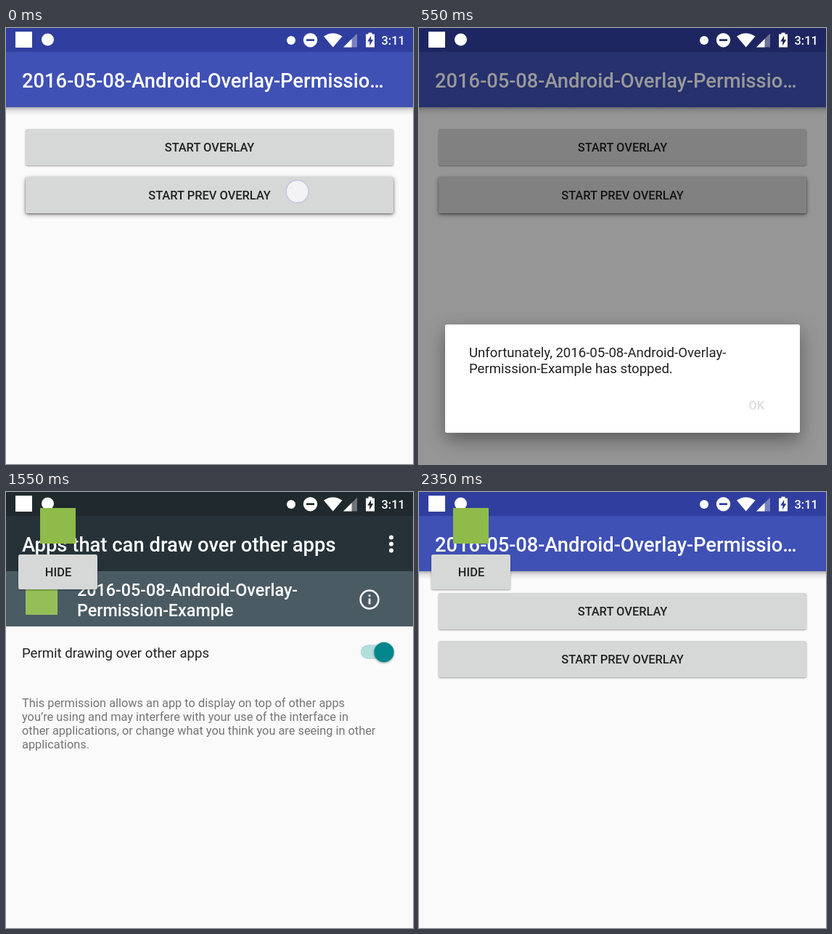
Recreate the animation shown at these times as an HTML page. Size 561x600 px, loop 2.4 s.

```html
<!DOCTYPE html>
<html lang="en">
<head>
<meta charset="utf-8">
<title>Overlay permission</title>
<style>
html, body { margin: 0; width: 100%; height: 100%; overflow: hidden; background: #fafafa; }
svg { display: block; width: 561px; height: 600px; }
text { font: 500 16.45px Roboto, sans-serif; fill: #212121; }
.title { font-size: 27.35px; fill: #fff; }
.name { font-size: 23.35px; fill: #fff; }
.body { font-size: 18.6px; font-weight: 400; }
.note { font-size: 16.35px; font-weight: 400; fill: #757575; }
.mid { text-anchor: middle; }
.btn { fill: #d6d7d7; filter: drop-shadow(0 1px 1.2px rgba(0,0,0,.38)); }
.raised { fill: #d6d7d7; filter: drop-shadow(0 2px 3px rgba(0,0,0,.4)); }
.touch { fill: rgba(248,248,250,.85); stroke: #bfc4e6; stroke-width: 1.5; }
.card { fill: #fff; filter: drop-shadow(0 10px 13px rgba(0,0,0,.38)); }
.thumb { filter: drop-shadow(0 1px 1.5px rgba(0,0,0,.4)); }

/* one loop is 2400 ms, held at 20 poses a second */
.press, .raised, .tap, .dim, .dialog, .settings, .slide, .on, .overlay { animation: 2.4s steps(2) infinite; }
.press { animation-name: press; }
.raised { animation-name: raised; }
.tap { animation-name: tap; }
.dim { animation-name: dim; }
.dialog { animation-name: dialog; }
.settings { animation-name: settings; }
.slide { animation-name: slide; animation-timing-function: steps(3); }
.on { animation-name: on; animation-timing-function: steps(3); }
.overlay { animation-name: overlay; }

@keyframes press {
  0%, 4.1667% { opacity: 1; }
  8.3333%, 100% { opacity: 0; }
}
@keyframes raised {
  0%, 27.0833% { opacity: 1; }
  31.25%, 100% { opacity: 0; }
}
@keyframes dim {
  0%, 12.5% { opacity: 0; }
  16.6667% { opacity: .2; animation-timing-function: steps(3); }
  22.9167%, 27.0833% { opacity: .4; animation-timing-function: steps(3); }
  33.3333%, 100% { opacity: 0; }
}
@keyframes dialog {
  0%, 12.5% { opacity: 0; }
  16.6667% { opacity: .93; }
  18.75%, 27.0833% { opacity: 1; }
  31.25%, 100% { opacity: 0; }
}
@keyframes settings {
  0%, 33.3333% { opacity: 0; transform: translateY(30px); }
  37.5%, 77.0833% { opacity: 1; transform: none; }
  81.25% { opacity: .42; transform: translateY(30px); }
  85.4167%, 100% { opacity: 0; transform: translateY(46px); }
}
@keyframes tap {
  0%, 37.4% { opacity: 0; }
  37.5%, 41.6667% { opacity: 1; }
  45.8333%, 100% { opacity: 0; }
}
@keyframes slide {
  0%, 41.6667% { transform: none; }
  47.9167%, 100% { transform: translateX(28px); }
}
@keyframes on {
  0%, 41.6667% { opacity: 0; }
  47.9167%, 100% { opacity: 1; }
}
@keyframes overlay {
  0%, 52.0833% { opacity: 0; }
  56.25%, 100% { opacity: 1; }
}
</style>
</head>
<body>
<svg viewBox="0 0 561 600">
  <defs>
    <linearGradient id="shade" x2="0" y2="1">
      <stop stop-color="#000" stop-opacity=".3"/>
      <stop offset=".4" stop-color="#000" stop-opacity=".1"/>
      <stop offset="1" stop-color="#000" stop-opacity="0"/>
    </linearGradient>
  </defs>

  <g>
    <rect width="561" height="600" fill="#fafafa"/>
    <rect y="109" width="561" height="11" fill="url(#shade)"/>
    <rect width="561" height="109" fill="#3f51b5"/>
    <rect width="561" height="33" fill="#303f9f"/>
    <text class="title" x="22" y="81.5">2016-05-08-Android-Overlay-Permissio…</text>
    <rect class="btn" x="27" y="139" width="507" height="50" rx="2.5"/>
    <text class="mid" x="280.5" y="170">START OVERLAY</text>
    <rect class="btn" x="27" y="205" width="507" height="50" rx="2.5"/>
    <rect class="raised" x="27" y="205" width="507" height="50" rx="2.5"/>
    <text class="mid" x="280.5" y="235.5">START PREV OVERLAY</text>
  </g>
  <circle class="touch press" cx="401.5" cy="225" r="15.5"/>

  <g class="settings">
    <rect width="561" height="600" fill="#fafafa"/>
    <rect width="561" height="33" fill="#20292d"/>
    <rect y="33" width="561" height="76" fill="#263238"/>
    <rect y="109" width="561" height="76" fill="#4b5b64"/>
    <text class="title" x="22" y="81.5">Apps that can draw over other apps</text>
    <g fill="#fff">
      <circle cx="531" cy="62.5" r="3"/>
      <circle cx="531" cy="71.5" r="3"/>
      <circle cx="531" cy="80.5" r="3"/>
      <circle cx="501" cy="148" r="12.4" fill="none" stroke="#fff" stroke-width="2.5"/>
      <path d="M499.7 146.5h2.7v8h-2.7zM499.7 141.3h2.7v2.7h-2.7z"/>
    </g>
    <rect x="27" y="125" width="44" height="44" fill="#94bf58"/>
    <text class="name" x="98" y="143">2016-05-08-Android-Overlay-</text>
    <text class="name" x="98" y="170.5">Permission-Example</text>
    <text class="body" x="22" y="227.5">Permit drawing over other apps</text>
    <rect x="489" y="210.5" width="36" height="19" rx="9.5" fill="#b4b4b4"/>
    <rect class="on" x="489" y="210.5" width="36" height="19" rx="9.5" fill="#b2dedc"/>
    <g class="slide">
      <circle class="thumb" cx="493" cy="220.5" r="13.7" fill="#f1f1f1"/>
      <circle class="on" cx="493" cy="220.5" r="13.7" fill="#00868b"/>
    </g>
    <text class="note" x="22" y="296">This permission allows an app to display on top of other apps</text>
    <text class="note" x="22" y="315">you’re using and may interfere with your use of the interface in</text>
    <text class="note" x="22" y="334">other applications, or change what you think you are seeing in other</text>
    <text class="note" x="22" y="353">applications.</text>
    <circle class="touch tap" cx="501.5" cy="205.5" r="15"/>
  </g>

  <rect class="dim" width="561" height="600"/>
  <g class="dialog">
    <rect class="card" x="36" y="408" width="489" height="149" rx="2.5"/>
    <text class="body" x="69" y="452.5">Unfortunately, 2016-05-08-Android-Overlay-</text>
    <text class="body" x="69" y="474.5">Permission-Example has stopped.</text>
    <text x="454.5" y="525" style="fill:#dcdcdc">OK</text>
  </g>

  <g fill="#fff" fill-rule="evenodd">
    <rect x="13" y="5" width="23" height="22"/>
    <circle cx="57.5" cy="16" r="8.5"/>
    <circle cx="393" cy="17" r="6"/>
    <path d="M419.5 7a9.700 9.700 0 0 1 0 19.400a9.700 9.700 0 0 1 0-19.400zM414 15.300v2.800h11v-2.800z"/>
    <path d="M438 11.500Q450.500 3 463.500 11.500L450.700 26.500z"/>
    <path d="M465 26.500L484 7.500V26.500z" opacity=".35"/>
    <path d="M465 26.500L476.500 15V26.500z"/>
    <path d="M496 8.500h3.500v-2h5v2h3.500v18h-12zM503.200 10.500l-5 8h3v6l5-8.500h-3z"/>
    <text x="517.5" y="22.5" style="fill:#fff">3:11</text>
  </g>

  <g class="overlay">
    <rect x="47" y="22" width="49" height="49" fill="#8fbb4a"/>
    <rect class="btn" x="17" y="86" width="109" height="48" rx="2.5"/>
    <text class="mid" x="72" y="116">HIDE</text>
  </g>
</svg>
</body>
</html>
```
